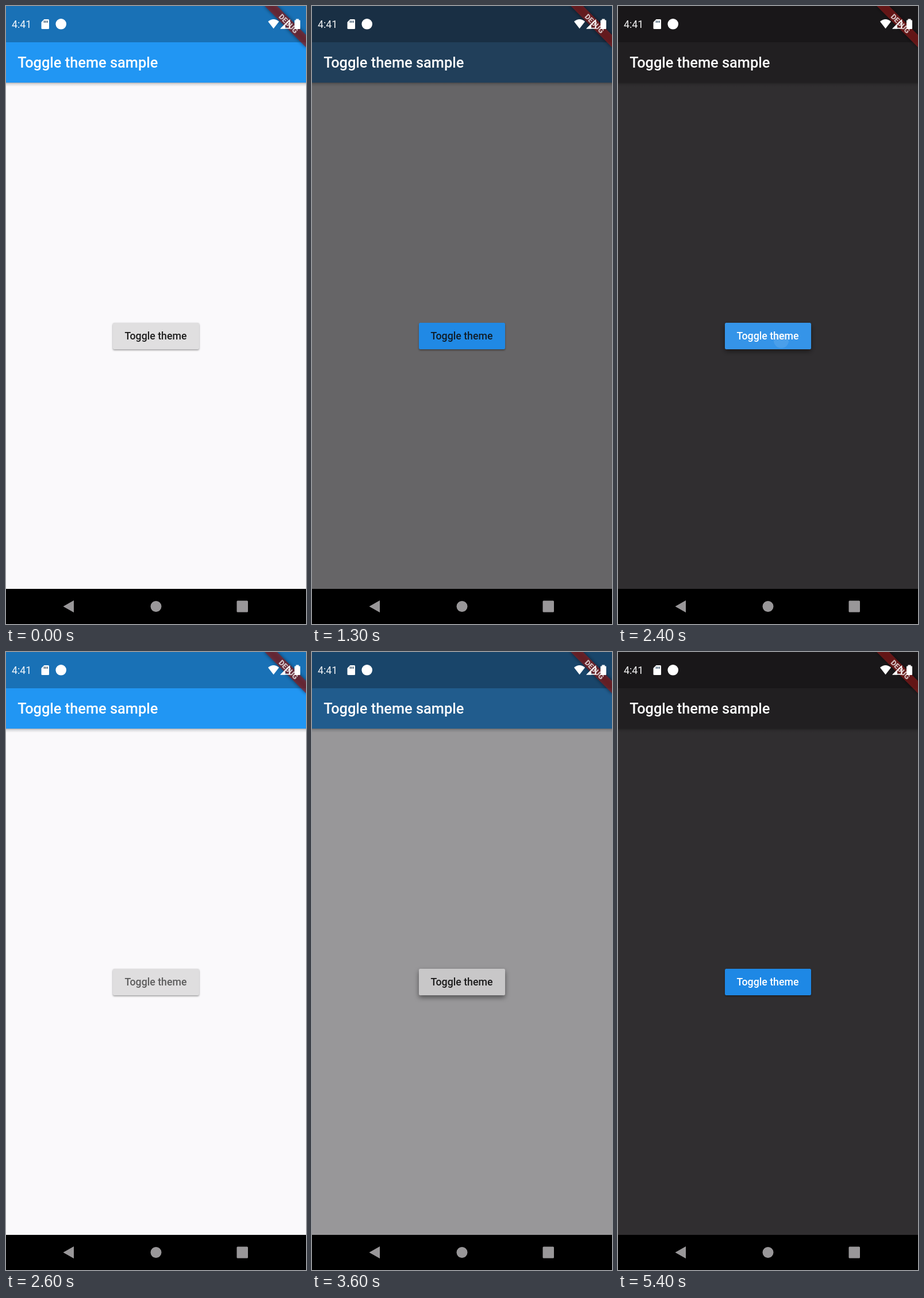
An HTML page for the animation above (5.7 s loop, 522 by 1073 pixels).

```html
<!DOCTYPE html>
<html lang="en">
<head>
<meta charset="utf-8">
<title>Toggle theme sample</title>
<style>
  html, body { margin: 0; width: 100%; height: 100%; overflow: hidden; background: #000; }
  svg { display: block; width: 522px; height: 1073px; font-family: Roboto, sans-serif; }
</style>
</head>
<body>
<svg viewBox="0 0 522 1073">
  <defs>
    <linearGradient id="barShade" x1="0" y1="0" x2="0" y2="1">
      <stop offset="0" stop-color="#000" stop-opacity=".3"/>
      <stop offset=".35" stop-color="#000" stop-opacity=".12"/>
      <stop offset="1" stop-color="#000" stop-opacity="0"/>
    </linearGradient>
    <filter id="soft" x="-20%" y="-50%" width="140%" height="200%">
      <feGaussianBlur id="blur" stdDeviation="1.5"/>
    </filter>
    <filter id="bannerSoft" x="-20%" y="-60%" width="140%" height="220%">
      <feGaussianBlur stdDeviation="3"/>
    </filter>
    <clipPath id="buttonClip"><rect x="186" y="550" width="150" height="46" rx="2.5"/></clipPath>
  </defs>

  <rect id="page" y="133" width="522" height="879"/>
  <rect y="133" width="522" height="7" fill="url(#barShade)"/>
  <rect id="bar" width="522" height="133"/>
  <rect width="522" height="63" fill="#000" fill-opacity=".25"/>
  <text x="20.3" y="107" font-size="25.38" font-weight="500" fill="#fff">Toggle theme sample</text>

  <rect id="shadow" x="186" y="550" width="150" height="46" rx="2.5" filter="url(#soft)"/>
  <g clip-path="url(#buttonClip)">
    <rect id="button" x="186" y="550" width="150" height="46"/>
    <rect id="highlight" x="186" y="550" width="150" height="46"/>
    <circle id="ripple" cx="284" cy="581" r="0"/>
  </g>
  <text id="label" x="260.5" y="579.3" font-size="17.76" font-weight="500" text-anchor="middle">Toggle theme</text>

  <g transform="translate(522 0) rotate(45)">
    <rect x="-51" y="35.5" width="102" height="15.3" fill="#000" fill-opacity=".5" filter="url(#bannerSoft)"/>
    <rect x="-51" y="35.5" width="102" height="15.3" fill="#961c1c" fill-opacity=".63"/>
    <text y="47.8" font-size="12.9" font-weight="900" text-anchor="middle" fill="#fff" fill-opacity=".72">DEBUG</text>
  </g>

  <g fill="#fff">
    <text x="10" y="38" font-size="17.8" fill-opacity=".95">4:41</text>
    <path d="M66.5 23H73.5Q75 23 75 24.5V38.5Q75 40 73.5 40H63Q61.500 40 61.500 38.500V28Z"/>
    <path d="M66.500 25.500v3.500m2.700 -3.500v3.500m2.700 -3.500v3.500" stroke="#1a3a55" stroke-width="1.300"/>
    <circle cx="95.700" cy="31.300" r="9.300"/>
    <path d="M456 27Q465.500 19 475 27L465.500 39.200Z"/>
    <path d="M477 39.500L486 30.500V39.500Z"/>
    <path d="M479.500 38.600L493.400 24.700V38.600Z" fill="none" stroke="#fff" stroke-width="1.700"/>
    <path d="M504.500 24.500V22.500H509.500V24.500H511Q512 24.500 512 25.500V39Q512 40 511 40H503Q502 40 502 39V25.500Q502 24.500 503 24.500Z"/>
  </g>

  <rect y="1012" width="522" height="61" fill="#000"/>
  <g fill="#999799">
    <path d="M99.500 1042.500L118 1032V1053Z"/>
    <circle cx="261" cy="1042.500" r="9.500"/>
    <rect x="401.500" y="1032.500" width="19.500" height="20" rx="1.500"/>
  </g>
</svg>
<script>
const LOOP = 5700, STEP = 100, FADE = 182;
const LIGHT = { page: [250, 249, 251], bar: [33, 150, 243], button: [224, 223, 224], ink: "#000" };
const DARK = { page: [48, 46, 48], bar: [33, 31, 33], button: [30, 136, 229], ink: "#fff" };
// The label colour starts to fade a little after the theme does.
const toggles = [
  { at: 1167, label: 1290, dark: 1 },
  { at: 2400, label: 2475, dark: 0 },
  { at: 3512, label: 3620, dark: 1 },
];

const clamp = x => Math.min(1, Math.max(0, x));
const ramp = (t, from, to) => clamp((t - from) / (to - from));
const mix = (a, b, k) => a + (b - a) * k;
const rgb = c => `rgb(${c.map(Math.round)})`;
const blend = (a, b, k) => rgb(a.map((v, i) => mix(v, b[i], k)));
const set = (id, attrs) => {
  const el = document.getElementById(id);
  for (const name in attrs) el.setAttribute(name, attrs[name]);
};

const darkness = (t, key) =>
  toggles.reduce((d, g) => mix(d, g.dark, ramp(t, g[key], g[key] + FADE)), 0);

// Press strength around a tap: quick rise, hold, drop, faint tail.
const pressLevel = dt =>
  ramp(dt, -110, -10) - .9 * ramp(dt, 90, 130) - .1 * ramp(dt, 130, 230);

function rippleAt(dt) {
  if (dt < -100 || dt > 90) return { r: 0, "fill-opacity": 0 };
  const r = dt < 0 ? 13 * (1 + dt / 100) : mix(13, 130, dt / 90);
  return { r, "fill-opacity": .1 * (1 - ramp(dt, 0, 90)) };
}

function draw(t) {
  const dark = darkness(t, "at");
  const labelDark = darkness(t, "label");
  const theme = dark > .5 ? DARK : LIGHT;
  const tap = toggles.find(g => t < g.at + 300);
  const dt = tap ? t - tap.at : -1000;
  const press = pressLevel(dt);

  set("page", { fill: blend(LIGHT.page, DARK.page, dark) });
  set("bar", { fill: blend(LIGHT.bar, DARK.bar, dark) });
  set("button", { fill: rgb(theme.button) });
  set("highlight", { fill: theme.ink, "fill-opacity": .1 * press });
  set("ripple", { fill: theme.ink, ...rippleAt(dt) });
  set("shadow", { y: mix(551.5, 554, press), "fill-opacity": mix(.4, .45, press) });
  set("blur", { stdDeviation: mix(1.5, 4, press) });
  set("label", {
    fill: blend([0, 0, 0], [255, 255, 255], labelDark),
    "fill-opacity": mix(.87, 1, labelDark),
  });
}

const start = performance.now();
function tick() {
  const t = (performance.now() - start) % LOOP;
  draw(Math.floor(t / STEP) * STEP);
  requestAnimationFrame(tick);
}
tick();
</script>
</body>
</html>
```
